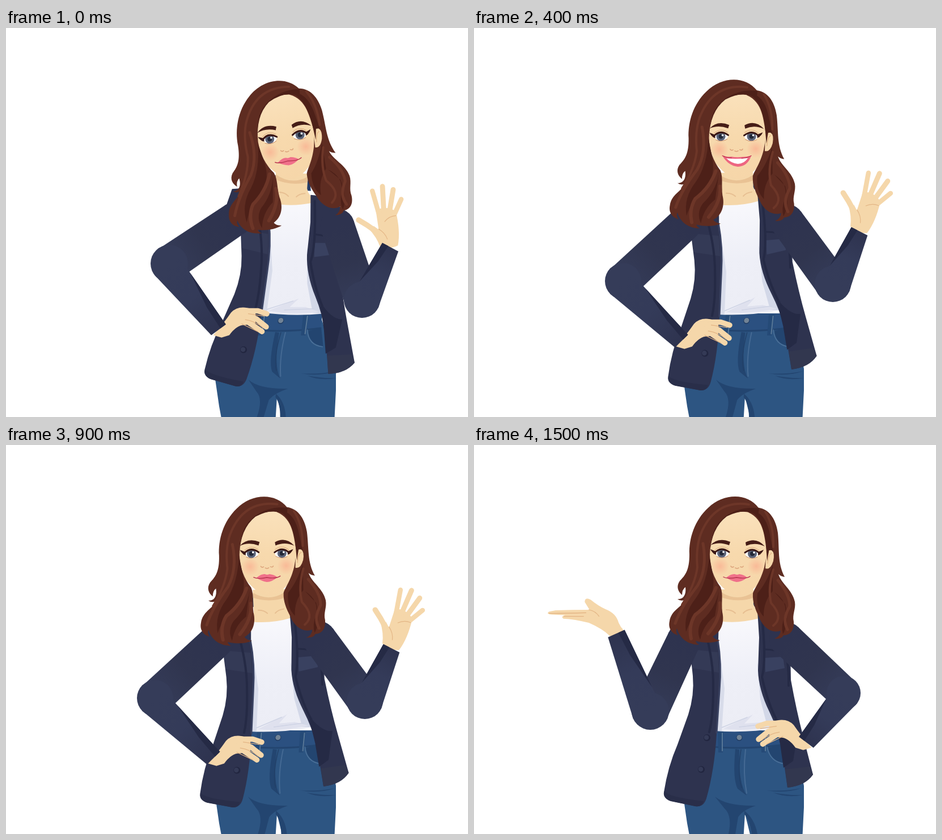
Write an HTML page with a canvas that moves like this. It is 815 by 687 pixels and loops after 1600 ms.

```html
<!DOCTYPE html>
<html lang="en">
<head>
<meta charset="utf-8">
<title>Waving woman</title>
<style>
html, body { margin: 0; width: 100%; height: 100%; overflow: hidden; background: #fff; }
canvas { display: block; }
</style>
</head>
<body>
<canvas id="stage" width="815" height="687"></canvas>
<script>
const ctx = document.getElementById('stage').getContext('2d');
const LOOP = 1600, STEP = 100, RAD = Math.PI / 180;
const SKIN = '#f5d7aa', SKIN_DARK = '#e3b585', NAVY = '#2e334f', NAVY_DARK = '#252a45', NAVY_LIGHT = '#353c59';
const HAIR = '#5e2c21', HAIR_DARK = '#4d2018', HAIR_LIGHT = '#6d3628', JEANS = '#2d5582', JEANS_DARK = '#234570';

// head / body: [shift, degrees]; arms: [elbow x, y, cuff x, y, elbow radius, hand degrees]
const KEYS = [
  { t: 0, head: [41, -9], body: [16, 4], hip: [17], left: [288, 416, 375, 533, 33, 0], right: [628, 480, 678, 387, 32, -8.5], hands: ['rest', 'wave'] },
  { t: 200, head: [-2, -4.5], body: [-2, .8], hip: [12], left: [267, 442, 362, 552, 32, 0], right: [628, 460, 652, 360, 32, 0], hands: ['rest', 'wave'], smile: 1, closed: 1 },
  { t: 400, head: [0, -1], body: [7, -1.3], hip: [13], left: [263, 447, 366, 553, 32, 0], right: [633, 452, 680, 359, 32, 18], hands: ['rest', 'wave'], smile: 1 },
  { t: 600, head: [1, 1.5], body: [7, -1.3], hip: [13], left: [263, 447, 366, 553, 32, 0], right: [620, 462, 644, 360, 32, -8], hands: ['rest', 'wave'], smile: 1 },
  { t: 900, head: [-2, -1.5], body: [7, -1.3], hip: [12], left: [263, 447, 366, 553, 32, 0], right: [633, 452, 680, 359, 32, 18], hands: ['rest', 'wave'] },
  { t: 1100, head: [-1, -.8], body: [3, -.6], hip: [6], left: [269, 447, 413, 487, 30, -6], right: [642, 446, 552, 389, 29, -20], hands: ['rest', 'chest'] },
  { t: 1300, head: [0, -.2], body: [1, -.2], hip: [3], left: [301, 468, 319, 319, 30, 0], right: [650, 438, 558, 501, 30, -3], hands: ['side', 'rest'] },
  { t: 1500, head: [0, 0], body: [0, 0], hip: [0], left: [311, 470, 251, 333, 33, 0], right: [652, 438, 586, 525, 30, 0], hands: ['offer', 'rest'] }
];

function poseAt(time) {
  const last = KEYS.findLastIndex(k => k.t <= time);
  const a = KEYS[last], b = KEYS[last + 1] || a;
  const u = a === b ? 0 : (time - a.t) / (b.t - a.t);
  const near = u < .5 ? a : b;
  const pose = { hands: near.hands, smile: near.smile, closed: near.closed };
  for (const part of ['head', 'body', 'hip', 'left', 'right'])
    pose[part] = a[part].map((v, i) => v + (b[part][i] - v) * u);
  ['left', 'right'].forEach((side, i) => {
    if (a.hands[i] !== b.hands[i]) pose[side][5] = near[side][5];
  });
  return pose;
}

function fill(d, color) {
  ctx.fillStyle = color;
  ctx.fill(new Path2D(d));
}
function line(d, color, width = 1) {
  ctx.strokeStyle = color;
  ctx.lineWidth = width;
  ctx.stroke(new Path2D(d));
}
function disc(x, y, r, color) {
  ctx.fillStyle = color;
  ctx.beginPath();
  ctx.arc(x, y, r, 0, 2 * Math.PI);
  ctx.fill();
}
function poly(points, color) {
  ctx.fillStyle = color;
  ctx.beginPath();
  points.forEach(p => ctx.lineTo(p[0], p[1]));
  ctx.fill();
}
function gradient(x0, y0, x1, y1, ...colors) {
  const g = ctx.createLinearGradient(x0, y0, x1, y1);
  colors.forEach((c, i) => g.addColorStop(i / (colors.length - 1), c));
  return g;
}
function placed(draw) {
  ctx.save();
  draw();
  ctx.restore();
}
function turnAbout(x, y, dx, degrees) {
  ctx.translate(x + dx, y);
  ctx.rotate(degrees * RAD);
  ctx.translate(-x, -y);
}

function drawJeans(shift) {
  fill('M400 504H553L576 570L582 602V640L579 700H490L478 651L475 700H382L376 668L369 620Z', JEANS);
  const k = -shift / 125;
  ctx.transform(1, 0, k, 1, -k * 640, 0);
  fill('M425 621Q446 638 497 637Q474 645 466 657L461 687H449Q456 655 442 642Z', JEANS_DARK);
  fill('M477 652Q487 663 490 687L500 687Q495 660 477 646Z', JEANS_DARK);
  fill('M420 504H540V530Q480 537 420 531Z', '#2b5080');
  line('M420 533Q480 538 540 530', JEANS_DARK, 3);
  fill('M461 537Q456 590 465 607Q474 614 481 619Q466 596 468 538Z', JEANS_DARK);
  line('M479 538Q474 580 481 615', '#456a94', 2);
  line('M471 538Q464 580 472 605', '#224068', 1.5);
  for (const x of [430, 506]) {
    fill(`M${x} 506h10l-1 37h-8Z`, '#254a77');
    line(`M${x + 8} 509v31`, '#587797', 2);
  }
  fill('M519 535Q524 559 549 562L541 529Z', JEANS_DARK);
  line('M517 533Q522 560 548 563', '#4b7098', 1.5);
  fill('M516 610Q548 612 577 606Q550 616 516 610ZM528 614Q555 619 580 618Q553 624 528 614Z', JEANS_DARK);
  disc(468, 517, 5.5, '#203b61');
  disc(468, 516.5, 4.5, '#718396');
}

function drawTorso() {
  fill('M431 262L432 285H500L496 262Z', '#263d68');
  fill('M436 255L437 296Q430 302 422 304L436 322H500L510 300Q496 294 493 281V255Z', SKIN);
  fill('M436 260Q465 278 493 260V270Q465 279 436 269Z', '#e9c294');
  line('M445 291Q455 291 461 297M490 290Q480 291 475 297', '#e7bf92', 2);
  fill('M432 311Q466 316 503 306L507 400L534 500Q482 509 425 505L433 400Z', gradient(0, 310, 0, 506, '#f8f8fc', '#eeeff7', '#ecedf5'));
  fill('M433 360L442 430L437 505H425L432 420Z', '#d8dcea');
  fill('M500 385L524 470L534 500L518 499L505 449Z', '#d3d8e8');
  fill('M440 501L492 476L477 492L505 490L530 497Q480 506 440 501Z', '#dfe1ee');
  line('M437 499L482 481M468 498L520 492', '#cfd4e5', 1.5);

  fill('M405 285Q430 292 432 304L431 345Q437 390 434 430L428 510Q424 575 410 624Q405 640 391 638L349 629Q333 625 335 613Q342 568 359 529L378 476Q389 442 386 408L381 360L352 324L361 291Z', NAVY);
  fill('M383 361L430 366L432 402L385 394Z', '#343a56');
  line('M407 325Q423 382 422 430Q422 480 415 507', NAVY_DARK, 4);
  line('M430 344Q437 386 433 433L428 508', '#394160', 3);
  fill('M336 611Q342 622 405 629Q402 640 390 638L347 629Q333 624 336 611Z', '#292e49');
  for (const [x, y] of [[411, 517], [401, 573]]) {
    disc(x, y, 6, '#222640');
    disc(x - 1, y - .5, 4.3, '#343a56');
  }

  fill('M500 292Q530 292 560 314L558 360L559 415Q569 470 580 512L598 582Q584 602 553 605L548 570L541 528Q535 500 521 471Q502 432 501 398L503 340Z', NAVY);
  fill('M513 376L545 374L548 394L514 401Z', '#394160');
  line('M513 361Q532 361 548 369', NAVY_DARK, 3);
  line('M508 302Q516 380 508 410Q518 455 534 486', NAVY_DARK, 4);
  fill('M529 478Q553 510 571 507L563 558L546 570L540 528Z', NAVY_DARK);
  fill('M549 573L592 568L598 582Q584 602 553 605Z', '#32374f');
  line('M549 360Q556 390 555 425', NAVY_DARK, 4);
}

function taper(a, b, [a0, a1], [b0, b1], color) {
  const len = Math.hypot(b[0] - a[0], b[1] - a[1]);
  const nx = -(b[1] - a[1]) / len, ny = (b[0] - a[0]) / len;
  const edge = (p, r) => [p[0] + nx * r, p[1] + ny * r];
  poly([edge(a, a0), edge(b, b0), edge(b, b1), edge(a, a1)], color);
  return edge;
}
function drawSleeve(shoulder, [ex, ey, cx, cy, r]) {
  const elbow = [ex, ey], cuff = [cx, cy];
  const bend = Math.sign((cx - ex) * (shoulder[1] - ey) - (cy - ey) * (shoulder[0] - ex));
  disc(...shoulder, 30, NAVY);
  taper(shoulder, elbow, [30, -30], [r - 1, 1 - r], gradient(...shoulder, ...elbow, NAVY, '#30354f', NAVY_LIGHT));
  disc(ex, ey, r, NAVY_LIGHT);
  const edge = taper(elbow, cuff, [bend * r * .64, -bend * r], [bend * 16, -bend * 16], gradient(...elbow, ...cuff, NAVY_LIGHT, '#343b59', NAVY));
  const along = f => [ex + (cx - ex) * f, ey + (cy - ey) * f];
  poly([edge(along(.25), bend * r * .6), edge(cuff, bend * 16), edge(cuff, bend * 4), edge(along(.7), bend * 7)], NAVY_DARK);
}

function finger(d, width = 9) {
  line(d, SKIN, width);
}
const HANDS = {
  rest() {
    fill('M-9 9Q8 -10 21 -29Q31 -40 48 -37L62 -34L62 -11L45 -8Q31 -9 18 9L5 13Z', SKIN);
    finger('M43 -32L66 -32L81 -27');
    finger('M45 -27L64 -18L80 -5');
    finger('M39 -20L60 -6L73 3');
    line('M50 -27L77 -23M45 -17Q61 -15 75 -3M39 -10L66 3', SKIN_DARK, 1.2);
  },
  chest() {
    HANDS.rest();
    finger('M29 -30Q46 -45 70 -50', 8);
  },
  wave() {
    fill('M-17 -3Q-20 -20 -32 -37L-22 -39L-15 -32L-15 -65Q5 -71 18 -58Q21 -24 13 -1Q-1 4 -17 -3Z', SKIN);
    finger('M-11 -60L-16 -98', 8);
    finger('M-2 -61L2 -103', 8.5);
    finger('M7 -58L19 -95', 8.5);
    finger('M14 -52L30 -77', 8);
    finger('M-20 -30Q-33 -43 -46 -53');
    line('M-15 -33Q-5 -25 -3 -14M-3 -44Q6 -52 17 -51', SKIN_DARK, 1.1);
  },
  side() {
    fill('M2 4Q9 -30 0 -52Q-9 -74 -9 -86Q-5 -94 -1 -85L-7 -112Q-2 -125 6 -111L18 -75Q21 -60 24 -49Q31 -55 33 -66Q39 -74 41 -65Q40 -44 29 -26L25 9Q13 15 2 4Z', SKIN);
    line('M0 -86L12 -54M2 -101L14 -70M27 -47Q27 -31 20 -23', SKIN_DARK, 1.2);
  },
  offer() {
    fill('M-11 4Q-23 -8 -46 -18Q-70 -24 -89 -25Q-94 -29 -86 -31L-108 -32Q-119 -33 -113 -37L-102 -39Q-75 -40 -45 -40L-53 -53Q-53 -62 -43 -57Q-31 -47 -18 -41Q0 -34 4 -18Q7 -11 12 -6Q2 6 -11 4Z', SKIN);
    line('M-113 -34Q-79 -34 -51 -35M-88 -29L-55 -29M-46 -40Q-35 -38 -29 -29', SKIN_DARK, 1.2);
  }
};
function drawHand(kind, arm, mirror) {
  ctx.translate(arm[2], arm[3]);
  if (mirror && kind !== 'wave') ctx.scale(-1, 1);
  ctx.rotate(arm[5] * RAD);
  ctx.scale(1.05, 1.05);
  HANDS[kind]();
}

function drawEye(x, y, flip, closed) {
  ctx.translate(x, y);
  ctx.scale(flip, 1);
  if (closed) {
    fill('M-13 0Q0 -12 13 1Q5 9 -13 2Z', '#e7bf91');
    line('M-10 -4Q0 -9 10 -3', '#b58563', 1);
    line('M-14 2Q0 10 13 4', '#3a1715', 4);
    line('M-12 3L-18 -2M-10 5L-17 4', '#3a1715', 2);
    return;
  }
  fill('M-13 0Q-3 -12 13 -1Q11 8 0 8Q-8 7 -13 0Z', '#fff');
  disc(0, 0, 8, '#5b6378');
  disc(0, 0, 4, '#222838');
  disc(flip * 3, -2, 1.8, '#fff');
  line('M-13 0Q-2 -13 13 -2', '#3a1715', 3);
  fill('M-10 -3L-20 -7Q-17 0 -10 3Z', '#3a1715');
  line('M-9 6Q1 11 11 5', '#c9926f', 1);
  line('M-12 -6Q0 -16 12 -7', '#d9ab7e', 1);
}

function drawCheek(x, y) {
  const g = ctx.createRadialGradient(x, y, 1, x, y, 16);
  g.addColorStop(0, '#f9b594d0');
  g.addColorStop(1, '#f9b59400');
  disc(x, y, 16, g);
}

function drawHead({ smile, closed }) {
  fill('M415 190C414 145 438 114 476 114Q512 117 517 185Q518 219 508 238Q484 268 464 267Q447 264 425 236Q416 212 415 190Z', gradient(0, 118, 0, 267, '#fae1bb', '#f7d9ad', '#f6d6a9'));
  drawCheek(434, 214);
  drawCheek(498, 214);

  fill('M502 111C482 84 440 85 413 111C389 133 379 165 380 193C380 221 373 230 363 240C356 250 360 259 367 265Q367 255 373 251C375 266 368 273 359 272Q365 277 374 273C365 287 348 292 345 311C342 324 349 333 360 336Q355 330 358 324C363 342 377 352 397 353Q392 350 391 346C406 350 422 350 434 345Q425 344 421 338C437 330 442 312 438 295C436 277 440 264 435 251C423 235 416 215 416 193C417 163 427 138 445 126C463 115 486 115 500 126Z', HAIR);
  fill('M484 112C515 104 532 126 536 155C539 185 535 208 548 233Q541 232 537 228C542 245 562 256 566 277C568 290 561 299 564 312C565 328 557 336 546 336Q543 343 530 342Q540 338 541 328C525 334 509 321 503 304C496 290 491 277 492 262C495 252 505 242 512 216L517 190C512 164 513 132 484 119Z', HAIR);

  fill('M503 112C468 106 433 125 423 153Q416 171 416 194Q418 147 446 126Q480 109 501 126Z', HAIR_DARK);
  fill('M490 116Q513 119 521 153L528 190L517 191Q514 151 503 132Z', HAIR_DARK);
  fill('M415 194Q412 242 391 271Q369 298 374 330Q383 303 406 286Q425 266 422 234Z', HAIR_DARK);
  fill('M432 258Q426 288 403 309Q391 325 399 344Q404 318 425 302Z', HAIR_DARK);
  fill('M527 212Q516 244 500 262Q497 289 511 303Q510 277 527 258Z', HAIR_DARK);
  fill('M530 260Q555 277 548 303Q541 320 545 334Q557 313 549 281Z', HAIR_DARK);
  line('M485 105Q425 96 400 157Q391 182 394 216Q390 247 367 282', HAIR_LIGHT, 4);
  line('M404 174Q412 218 394 249Q366 284 355 315', HAIR_LIGHT, 5);
  line('M427 252Q416 281 390 300Q378 319 383 342M434 279Q436 306 413 333', HAIR_LIGHT, 6);
  line('M514 118Q529 142 528 180M528 220Q518 253 524 279Q547 304 528 319', HAIR_LIGHT, 4);
  line('M536 239Q557 263 557 285Q543 308 553 326', HAIR_LIGHT, 5);

  fill('M515 193Q517 184 525 186Q531 190 528 205Q523 221 514 218Z', SKIN);
  line('M518 209Q519 194 525 191', SKIN_DARK, 1.3);
  fill('M515 176L521 183L517 205Z', HAIR_DARK);

  fill('M417 177Q431 162 452 171L450 177Q432 170 417 177Z', '#461d17');
  fill('M479 172Q498 162 513 179Q496 171 480 178Z', '#461d17');
  placed(() => drawEye(437, 191, 1, closed));
  placed(() => drawEye(491, 192, -1, closed));
  line('M453 214Q455 217 458 215M461 217Q464 219 467 217M470 215Q474 217 475 214', '#dca47c', 1.6);

  if (smile) {
    fill('M439 225Q446 228 455 227Q464 229 473 228Q482 228 490 226Q483 245 466 245Q449 243 439 225Z', '#ed6681');
    fill('M446 230Q465 232 484 230Q477 240 466 240Q455 239 446 230Z', '#fff');
    line('M439 225Q447 229 455 229M490 226Q482 230 473 230', '#bd344f', 1.2);
  } else {
    fill('M445 234Q454 227 460 228Q464 230 468 228Q476 229 482 234Q472 242 463 242Q453 240 445 234Z', '#f0708a');
    line('M440 233Q447 237 463 234Q480 237 487 232', '#b6354f', 1.4);
  }
}

function shoulderAt(x, [shift, degrees]) {
  const c = Math.cos(degrees * RAD), s = Math.sin(degrees * RAD), dx = x - 470, dy = -257;
  return [470 + shift + dx * c - dy * s, 600 + dx * s + dy * c];
}

function render(time) {
  const pose = poseAt(time);
  ctx.fillStyle = '#fff';
  ctx.fillRect(0, 0, 815, 687);
  ctx.lineCap = ctx.lineJoin = 'round';
  placed(() => drawJeans(pose.hip[0]));
  placed(() => {
    turnAbout(470, 600, ...pose.body);
    drawTorso();
  });
  [['left', 371], ['right', 551]].forEach(([side, x], i) => {
    placed(() => drawHand(pose.hands[i], pose[side], i === 1));
    drawSleeve(shoulderAt(x, pose.body), pose[side]);
  });
  placed(() => {
    turnAbout(464, 275, ...pose.head);
    drawHead(pose);
  });
}

function tick(now) {
  render(Math.floor(now % LOOP / STEP) * STEP);
  requestAnimationFrame(tick);
}
render(0);
requestAnimationFrame(tick);
</script>
</body>
</html>
```
